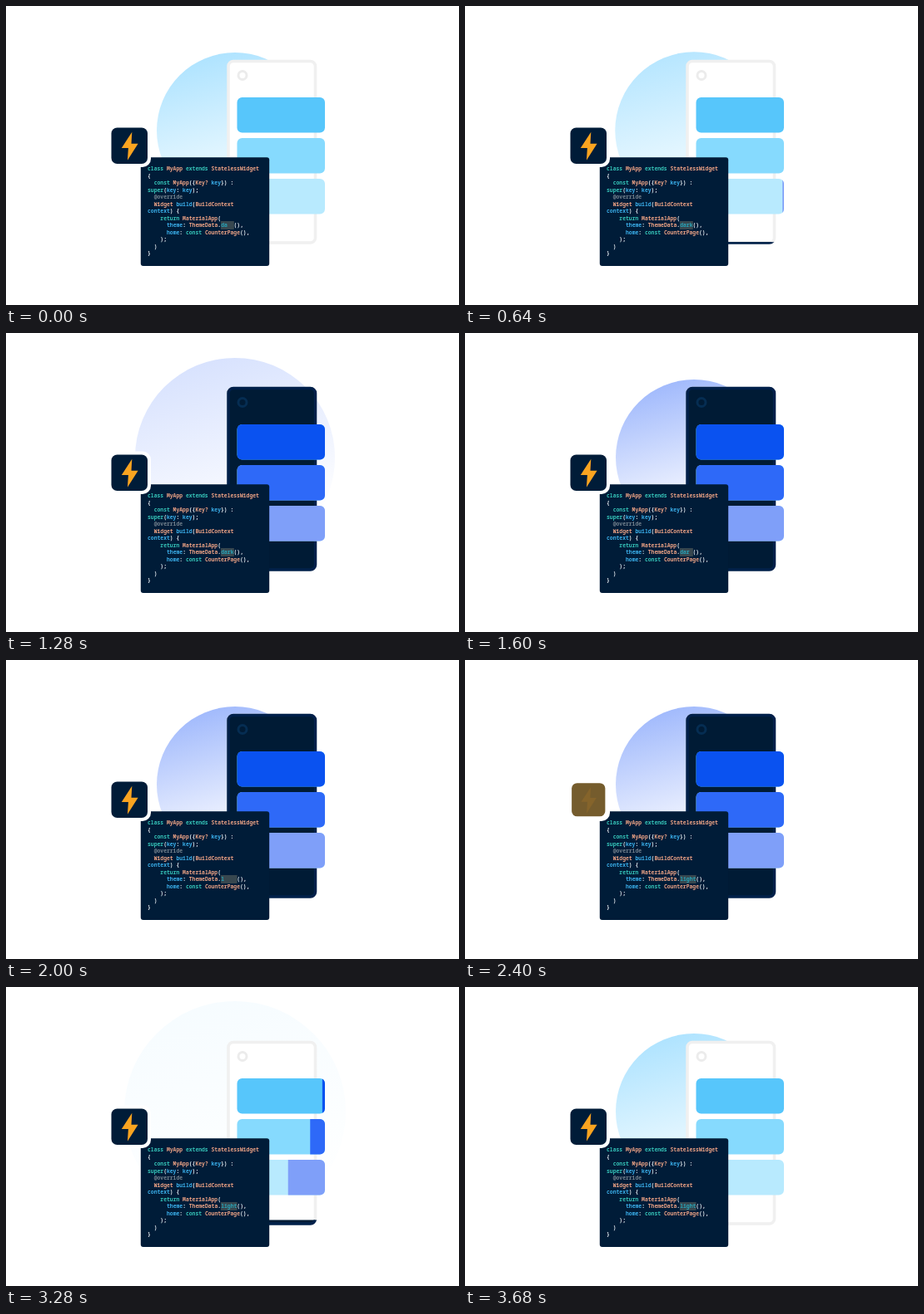
Write an HTML page that moves like this. It is 544 px wide and 360 px high and loops after 3760 ms.

```html
<!DOCTYPE html>
<html lang="en">
<head>
<meta charset="utf-8">
<title>Theme switch</title>
<style>
  html, body { margin: 0; width: 100%; height: 100%; overflow: hidden; background: #fff; }
  svg { display: block; width: 544px; height: 360px; }
  text { font: 600 6.39px "Noto Sans Mono", "DejaVu Sans Mono", monospace; white-space: pre; }
</style>
</head>
<body>
<svg viewBox="0 0 544 360">
  <defs>
    <linearGradient id="skyLight" x1=".36" y1="0" x2=".6" y2=".85">
      <stop offset="0" stop-color="#aee3ff"/><stop offset="1" stop-color="#f4fcff"/>
    </linearGradient>
    <linearGradient id="skyDark" x1=".36" y1="0" x2=".6" y2=".8">
      <stop offset="0" stop-color="#a0b9fc"/><stop offset="1" stop-color="#fafbff"/>
    </linearGradient>
    <clipPath id="darkClip"><rect id="darkArea" x="260" width="120"/></clipPath>
  </defs>
  <circle id="halo" cx="275" cy="150"/>
  <g id="phoneLight"></g>
  <g id="phoneDark" clip-path="url(#darkClip)"></g>
  <g id="bars"></g>
  <rect x="161.8" y="182.3" width="154.4" height="130.7" rx="3" fill="#001c38"/>
  <rect id="mark" y="259" height="10" fill="#37474f"/>
  <g id="code"></g>
  <rect x="122.5" y="142.5" width="51.5" height="51.5" rx="10" fill="#fff"/>
  <g id="tile">
    <rect id="tileBox" x="126.5" y="146.5" width="43.5" height="43.5" rx="7"/>
    <path id="bolt" d="M151.3 151.7L138.8 171H146.9L145.9 185.7L158.6 165.7H150.5Z"/>
  </g>
</svg>
<script>
const LOOP = 3760, STEP = 80;
const TO_DARK = 592, TO_LIGHT = 2730;
const CHAR = 3.834, LINE = 8.5, LEFT = 170, TOP = 198.4;
const NAVY = [0, 28, 56], ORANGE = [250, 164, 32];

const $ = id => document.getElementById(id);
const set = (el, attrs) => { for (const k in attrs) el.setAttribute(k, attrs[k]); return el; };
const add = (parent, tag, attrs) =>
  parent.appendChild(set(document.createElementNS('http://www.w3.org/2000/svg', tag), attrs));
const part = (t, start, len) => Math.min(1, Math.max(0, (t - start) / len));
const ease = p => p < .5 ? 2 * p * p : 1 - 2 * (1 - p) ** 2;
const mix = (a, b, p) => `rgb(${a.map((v, i) => Math.round(v + (b[i] - v) * p))})`;

function drawPhone(id, fill, edge, ring) {
  add($(id), 'rect', { x: 267, y: 66.5, width: 104.5, height: 218.5, rx: 6, fill, stroke: edge, 'stroke-width': 3.5 });
  add($(id), 'circle', { cx: 284, cy: 83.5, r: 5, fill: 'none', stroke: ring, 'stroke-width': 3 });
}
drawPhone('phoneLight', '#fff', '#f0f0f0', '#ececec');
drawPhone('phoneDark', '#001b35', '#01204a', '#052d52');

const bars = [['#57c6fb', '#0a52f0'], ['#86dafe', '#2e69f8'], ['#b8eafe', '#7f9ff9']].map(([light, dark], i) => {
  const y = 110 + 49 * i, box = { x: 277.5, y, width: 105.5, height: 42.5, rx: 6 };
  const clip = add(document.querySelector('defs'), 'clipPath', { id: 'bar' + i });
  add($('bars'), 'rect', { ...box, fill: light });
  add($('bars'), 'rect', { ...box, fill: dark, 'clip-path': `url(#bar${i})` });
  return add(clip, 'rect', { y, width: 110, height: 43 });
});

// Each token is a colour key followed by its text: k keyword, t type, b name, w plain, g annotation
const INK = { k: '#35c3b8', t: '#eba184', b: '#3aaee9', w: '#eef3f7', g: '#74818d' };
const LINES = [
  [0, 'kclass ', 'tMyApp ', 'kextends ', 'tStatelessWidget'],
  [0, 'w{'],
  [2, 'kconst ', 'tMyApp', 'w({', 'tKey? ', 'bkey', 'w}) :'],
  [0, 'ksuper', 'w(', 'bkey', 'w: ', 'bkey', 'w);'],
  [2, 'g@override'],
  [2, 'tWidget ', 'bbuild', 'w(', 'tBuildContext'],
  [0, 'bcontext', 'w) {'],
  [4, 'kreturn ', 'tMaterialApp', 'w('],
  [6, 'btheme', 'w: ', 'tThemeData', 'w.'],
  [6, 'bhome', 'w: ', 'kconst ', 'tCounterPage', 'w(),'],
  [4, 'w);'],
  [2, 'w)'],
  [0, 'w}']
];
LINES.forEach(([indent, ...tokens], row) => {
  const line = add($('code'), 'text', { x: LEFT + indent * CHAR, y: TOP + row * LINE });
  for (const s of tokens) add(line, 'tspan', { fill: INK[s[0]] }).textContent = s.slice(1);
});
const wordX = LEFT + 23 * CHAR, wordY = TOP + 8 * LINE;
const word = add($('code'), 'text', { x: wordX, y: wordY, fill: '#27a3b8' });
const tail = add($('code'), 'text', { y: wordY, fill: INK.w });
tail.textContent = '(),';
set($('mark'), { x: wordX - .3 });

function typed(t) {
  if (t < 1600) return 'dark'.slice(0, t < 80 ? 2 : t < 160 ? 3 : 4);
  if (t < 1920) return 'dark'.slice(0, t < 1760 ? 3 : t < 1840 ? 2 : 1);
  return 'light'.slice(0, Math.floor((t - 1920) / 80));
}

function drawHalo(t) {
  const start = t < 2000 ? TO_DARK : TO_LIGHT;
  const grow = part(t, start, 500), back = part(t, start + 500, 450);
  const dark = t >= TO_DARK + 500 && t < TO_LIGHT + 500;
  set($('halo'), {
    r: 94 + 40 * (ease(grow) - ease(back)),
    opacity: 1 - grow + back,
    fill: `url(#${dark ? 'skyDark' : 'skyLight'})`
  });
}

function drawTile(t) {
  const p = part(t, 142, 500) + part(t, 2280, 500);
  const flash = Math.sin(Math.PI * p) ** 2, s = 1 - .16 * flash;
  set($('tileBox'), { fill: mix(NAVY, ORANGE, flash) });
  set($('bolt'), { fill: mix(ORANGE, NAVY, flash) });
  set($('tile'), { transform: `translate(148.25 168.25) scale(${s}) translate(-148.25 -168.25)` });
}

function draw(t) {
  drawHalo(t);

  // Dark rises from the foot of the phone; light later falls from its head
  const top = 64 + 223 * (1 - ease(part(t, TO_DARK, 625)) + ease(part(t, TO_LIGHT, 625)));
  set($('darkArea'), { y: top, height: Math.max(0, 287 - top) });
  bars.forEach((bar, i) => {
    const on = ease(part(t, 595 + 77 * (2 - i), 500)), off = ease(part(t, 2841 + 84 * i, 500));
    set(bar, { x: 277.5 + 105.5 * (1 - on + off) });
  });

  const slots = t < 1920 ? 4 : 5;
  word.textContent = typed(t);
  set(tail, { x: wordX + slots * CHAR });
  set($('mark'), { width: slots * CHAR + .6 });
  drawTile(t);
}

function tick() {
  const t = performance.now() % LOOP;
  draw(Math.floor(t / STEP) * STEP);
  requestAnimationFrame(tick);
}
tick();
</script>
</body>
</html>
```
